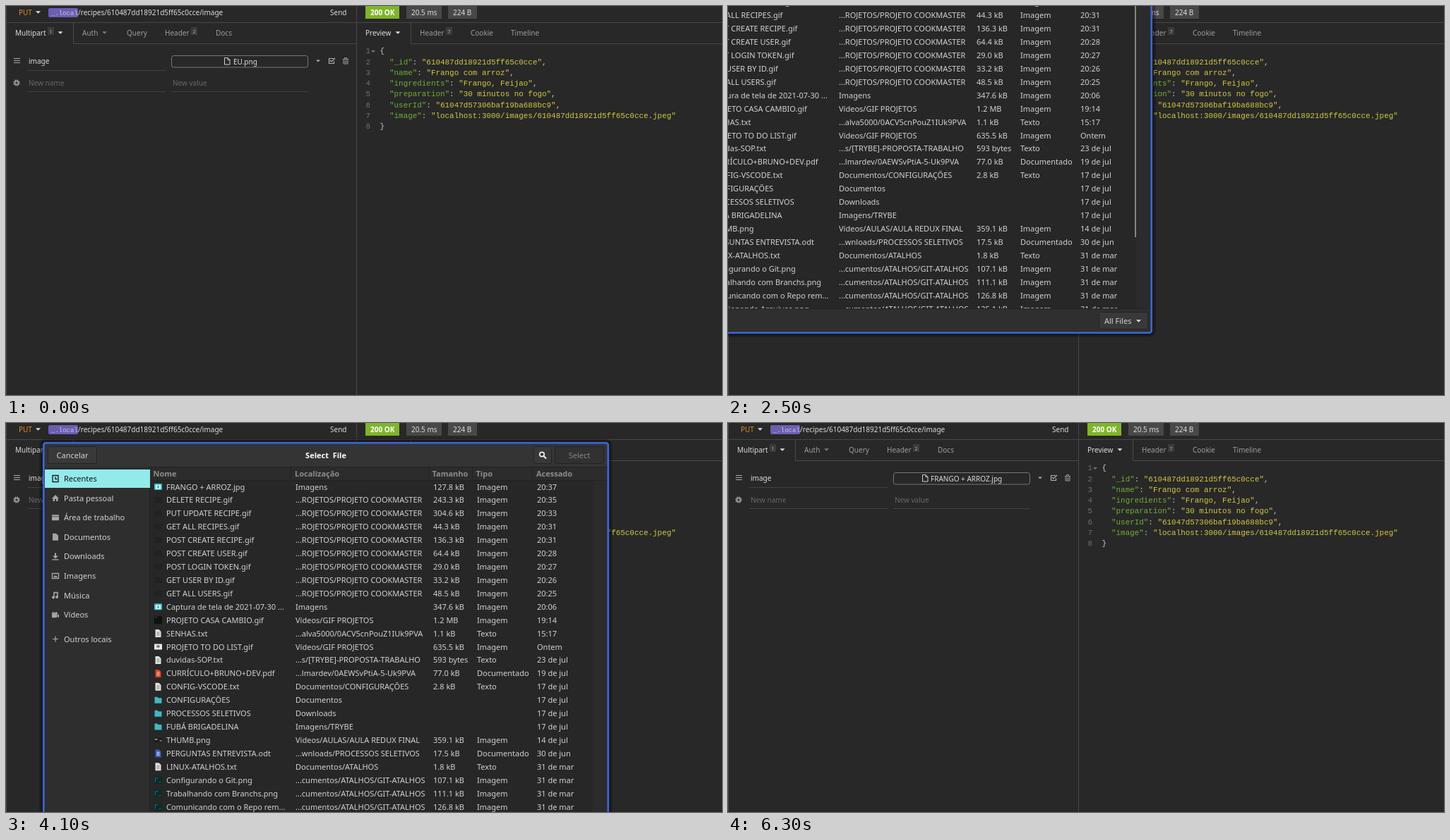
Animation, 1014 px wide and 552 px high, one loop 8000 ms. Source, as an HTML page:

```html
<!DOCTYPE html>
<html lang="pt">
<head>
<meta charset="utf-8">
<title>File picker</title>
<style>
html, body { margin: 0; width: 100%; height: 100%; overflow: hidden; background: #282828; }
svg { display: block; width: 1014px; height: 552px; }
text { font: 11px "Noto Sans", sans-serif; fill: #d2d2d2; white-space: pre; }
.app text { font-size: 10px; fill: #dcdcdc; }
.app .dim { fill: #9c9c9c; }
.app .faint { fill: #676767; }
.app .sup { font-size: 7px; fill: #b0b0b0; }
.app .put { fill: #dd8a25; }
.app .ok { fill: #fff; font-weight: 700; }
.app .mono { font: 10.91px "Liberation Mono", monospace; fill: #c8c8c8; }
.app .num { fill: #707070; text-anchor: end; }
.app .tag { font: 9px "Liberation Mono", monospace; fill: #cbc5ec; }
.key { fill: #72ad31; }
.str { fill: #d2c93f; }
.head { font-weight: 700; fill: #8d8d8d; }
.title { font-weight: 700; fill: #fff; text-anchor: middle; }
.mid { text-anchor: middle; }

.dlg, .dlg *, .app * { animation-duration: 8s; animation-timing-function: step-end; animation-iteration-count: infinite; }
.dlg { animation-name: move; }
.late { animation-name: late; }
.bar { animation-name: bar; }
.recent { animation-name: recent; }
.folder { animation-name: folder; }
.files { animation-name: files; }
.pick { animation-name: pick; }
.first text { animation-name: first; }
.chosen text { animation-name: chosen; }
.fadeout { animation-name: fadeout; }
.fadein { animation-name: fadein; }
.leave { animation-name: leave; }
.enter { animation-name: enter; }
.select { animation-name: select; }
.press { animation-name: press; }
.before { animation-name: before; }
.after { animation-name: after; }
@keyframes move {
  0% { opacity: 0; transform: translate(-247px, -107px); }
  6.25% { opacity: 1; transform: translate(-247px, -107px); }
  31.25% { opacity: 1; transform: translate(-200px, -107px); }
  33.75% { opacity: 1; transform: translate(-97px, -37px); }
  36.25% { opacity: 1; transform: translate(20px, 25px); }
  38.75% { opacity: 1; transform: translate(52px, 31px); }
  41.25% { opacity: 1; transform: translate(53px, 29px); }
  43.75% { opacity: 1; transform: translate(53px, 27px); }
  78.75%, 100% { opacity: 0; transform: translate(53px, 27px); }
}
@keyframes late { 0% { opacity: 0; } 13.75%, 100% { opacity: 1; } }
@keyframes bar {
  0% { opacity: 0; height: 391px; }
  16.25% { opacity: 1; height: 391px; }
  18.75% { opacity: 1; height: 378px; }
  51.25%, 100% { opacity: 0; height: 378px; }
}
@keyframes recent { 0% { opacity: 1; } 53.75%, 100% { opacity: 0; } }
@keyframes folder { 0% { opacity: 0; } 53.75%, 100% { opacity: 1; } }
@keyframes files { 0% { opacity: 0; } 56.25%, 100% { opacity: 1; } }
@keyframes pick { 0% { transform: none; } 71.25%, 100% { transform: translateY(113.5px); } }
@keyframes first { 0% { fill: #101010; } 71.25%, 100% { fill: #d2d2d2; } }
@keyframes chosen { 0% { fill: #d2d2d2; } 71.25%, 100% { fill: #101010; } }
@keyframes fadeout { 0% { opacity: 1; } 53.75% { opacity: .5; } 56.25%, 100% { opacity: 0; } }
@keyframes fadein { 0% { opacity: 0; } 53.75% { opacity: .5; } 56.25%, 100% { opacity: 1; } }
@keyframes leave { 0% { fill: #101010; color: #202020; } 56.25%, 100% { fill: #d2d2d2; color: #a5a5a5; } }
@keyframes enter { 0% { fill: #d2d2d2; color: #a5a5a5; } 53.75%, 100% { fill: #101010; color: #202020; } }
@keyframes select { 0% { fill: #858585; } 53.75% { fill: #acacac; } 56.25%, 100% { fill: #dcdcdc; } }
@keyframes press { 0% { fill: #313131; } 53.75% { fill: #393939; } 73.75%, 100% { fill: #222; } }
@keyframes before { 0% { opacity: 1; } 78.75%, 100% { opacity: 0; } }
@keyframes after { 0% { opacity: 0; } 78.75%, 100% { opacity: 1; } }
</style>
</head>
<body>
<svg id="stage" viewBox="0 0 1014 552">
  <defs><clipPath id="list"><rect x="151" y="36" width="648" height="500"/></clipPath></defs>
</svg>
<script>
const text = (x, y, s, cls = '') => `<text x="${x}" y="${y + 4}" class="${cls}">${s}</text>`;
const rect = (x, y, w, h, fill, more = '') =>
  `<rect x="${x}" y="${y}" width="${w}" height="${h}" fill="${fill}" ${more}/>`;
const path = (d, fill, more = '') => `<path d="${d}" fill="${fill}" ${more}/>`;
const line = (d, color, w = 1) => path(d, 'none', `stroke="${color}" stroke-width="${w}"`);
const at = (x, y, body, cls = '') => `<g transform="translate(${x} ${y})" class="${cls}">${body}</g>`;
const group = (cls, body) => `<g class="${cls}">${body}</g>`;
const caret = (x, y, color = '#ddd', r = 3.5) => path(`M${x - r} ${y - r / 2}h${2 * r}l${-r} ${r}z`, color);

// Request and response panes
function panes() {
  const edge = '#484848';
  const doc = x => line(`M${x} 73.5h4.5l3 3v6.500h-7.500zM${x + 4.5} 73.500v3h3`, '#d0d0d0');
  const json = [
    ['_id', '610487dd18921d5ff65c0cce'], ['name', 'Frango com arroz'],
    ['ingredients', 'Frango, Feijao'], ['preparation', '30 minutos no fogo'],
    ['userId', '61047d57306baf19ba688bc9'],
    ['image', 'localhost:3000/images/610487dd18921d5ff65c0cce.jpeg']
  ];
  const row = i => 63.2 + 15.3 * i;
  let s = rect(0, 0, 1014, 552, '#282828');
  s += line('M.5 0V552M496.5 0V552M0 23.500H1014M95.500 23V53.500H496M573.500 23V53.500H1014', edge);

  s += text(18, 9, 'PUT', 'put') + caret(45.500, 9);
  s += rect(60, 3, 42, 13, '#6a5fb0', 'rx="2"') + text(64, 9, '_.local', 'tag');
  s += text(102, 8.500, '/recipes/610487dd18921d5ff65c0cce/image') + text(459, 9, 'Send');
  s += rect(509, -2, 48, 20, '#7fb52b') + text(516, 9, '200 OK', 'ok');
  s += rect(567, -2, 50, 20, '#484848') + text(574, 9, '20.5 ms');
  s += rect(626, -2, 41, 20, '#484848') + text(633, 9, '224 B');

  s += text(13, 38, 'Multipart') + rect(59, 30, 9, 11, '#3c3c3c') + text(61.500, 34.500, '1', 'sup') + caret(77, 38);
  s += text(108, 38, 'Auth', 'dim') + caret(139.500, 38, '#777');
  s += text(171, 38, 'Query', 'dim') + text(225, 38, 'Header', 'dim') + text(297, 38, 'Docs', 'dim');
  s += rect(262, 30, 9, 11, '#3c3c3c') + text(264.500, 34.500, '2', 'sup');
  s += text(509, 38, 'Preview') + caret(555, 38);
  s += text(586, 38, 'Header', 'dim') + rect(623, 30, 9, 11, '#3c3c3c') + text(625.500, 34.500, '7', 'sup');
  s += text(658, 38, 'Cookie', 'dim') + text(715, 38, 'Timeline', 'dim');

  s += line('M11 74.500h9M11 77.500h9M11 80.500h9', '#aaa') + text(32, 78, 'image');
  s += line('M30 91.500H226M30 121.500H226M234 121.500H428', '#414141');
  s += rect(234.5, 70.5, 193, 16.5, 'none', 'rx="3" stroke="#777"');
  s += group('before', doc(309.5) + text(322, 78.500, 'EU.png'));
  s += group('after', doc(275.5) + text(287, 78.500, 'FRANGO + ARROZ.jpg'));
  s += caret(442, 78, '#aaa', 3);
  s += line('M464 74.500h-6.500v7h7v-3M459 77l2 2 5-5', '#b0b0b0', 1.2);
  s += line('M477 75.500h8M479.500 75v-1.500h3v1.500M478 76v6h6v-6M480 77v4M482 77v4', '#999');
  s += `<circle cx="15" cy="109" r="2.600" fill="none" stroke="#999" stroke-width="2"/>`;
  s += `<circle cx="15" cy="109" r="4" fill="none" stroke="#999" stroke-width="1.500" stroke-dasharray="1.570"/>`;
  s += text(32, 109, 'New name', 'faint') + text(236, 109, 'New value', 'faint');

  for (let i = 0; i < 8; i++) s += text(516, row(i), i + 1, 'mono num');
  s += caret(520, 64.500, '#777', 3) + text(529.5, row(0), '{', 'mono') + text(529.5, row(7), '}', 'mono');
  json.forEach(([k, v], i) => {
    s += text(543, row(i + 1), `<tspan class="key">"${k}"</tspan>: <tspan class="str">"${v}"</tspan>` +
      (i < 5 ? ',' : ''), 'mono');
  });
  return group('app', s);
}

// File type icons, centred on the origin
const page = (fill, mark) => path('M-4-5.500h5l3 3v8h-8z', fill) + line('M-2-1.500h4M-2 .500h4M-2 2.500h4', mark);
const icons = {
  cam: rect(-5.5, -4.5, 11, 9, '#43bfcb', 'rx="1"') + rect(-3.5, -2.5, 7, 5.5, '#e4f6f6') +
    '<circle r="1.700" cy=".3" fill="#43a5b2"/>',
  dark: rect(-5.5, -4, 11, 8, '#222'),
  black: rect(-5.5, -5.5, 11, 11, '#111') + rect(-4.5, -4.5, 3, 1, '#555'),
  white: rect(-5.5, -4, 11, 8, '#e8e8e8') + rect(-2, -2, 4, 3, '#666'),
  txt: page('#e2e2e2', '#888'),
  pdf: page('#d8431f', '#f3d8d0'),
  odt: page('#3d5fc4', '#dde4fa'),
  dir: path('M-5-4.500h4l1 1.500h5v7.500h-10z', '#3fb8c6'),
  thumb: rect(-5.5, -3, 11, 6, '#1c1c1c') + rect(-5, -2, 4, 2, '#8a8a8a') + rect(2, 0, 3, 2, '#777'),
  git: rect(-5.5, -5.5, 11, 11, '#0d2b2c') + line('M-4 3v-6h4M1 3h3', '#1d6b68'),
  cover: rect(-6, -1.5, 12, 3, '#22b887'),
  face: rect(-5.5, -6, 11, 12, '#c9c2b8') + '<circle r="2.500" cy="-2" fill="#4a3a33"/>' + path('M-5 6q0-5 5-5t5 5z', '#4a3a33'),
  sheet: rect(-6, -3.5, 12, 7, '#eee') + rect(-5, -2.5, 5, 1, '#999')
};

const cook = '...ROJETOS/PROJETO COOKMASTER', git = '...cumentos/ATALHOS/GIT-ATALHOS';
const recents = `cam|FRANGO + ARROZ.jpg|Imagens|127.8 kB|Imagem|20:37
dark|DELETE RECIPE.gif|${cook}|243.3 kB|Imagem|20:35
dark|PUT UPDATE RECIPE.gif|${cook}|304.6 kB|Imagem|20:33
dark|GET ALL RECIPES.gif|${cook}|44.3 kB|Imagem|20:31
dark|POST CREATE RECIPE.gif|${cook}|136.3 kB|Imagem|20:31
dark|POST CREATE USER.gif|${cook}|64.4 kB|Imagem|20:28
dark|POST LOGIN TOKEN.gif|${cook}|29.0 kB|Imagem|20:27
dark|GET USER BY ID.gif|${cook}|33.2 kB|Imagem|20:26
dark|GET ALL USERS.gif|${cook}|48.5 kB|Imagem|20:25
cam|Captura de tela de 2021-07-30 ...|Imagens|347.6 kB|Imagem|20:06
black|PROJETO CASA CAMBIO.gif|Vídeos/GIF PROJETOS|1.2 MB|Imagem|19:14
txt|SENHAS.txt|...alva5000/0ACV5cnPouZ1IUk9PVA|1.1 kB|Texto|15:17
white|PROJETO TO DO LIST.gif|Vídeos/GIF PROJETOS|635.5 kB|Imagem|Ontem
txt|duvidas-SOP.txt|...s/[TRYBE]-PROPOSTA-TRABALHO|593 bytes|Texto|23 de jul
pdf|CURRÍCULO+BRUNO+DEV.pdf|...lmardev/0AEWSvPtiA-5-Uk9PVA|77.0 kB|Documentado|19 de jul
txt|CONFIG-VSCODE.txt|Documentos/CONFIGURAÇÕES|2.8 kB|Texto|17 de jul
dir|CONFIGURAÇÕES|Documentos|||17 de jul
dir|PROCESSOS SELETIVOS|Downloads|||17 de jul
dir|FUBÁ BRIGADELINA|Imagens/TRYBE|||17 de jul
thumb|THUMB.png|Vídeos/AULAS/AULA REDUX FINAL|359.1 kB|Imagem|14 de jul
odt|PERGUNTAS ENTREVISTA.odt|...wnloads/PROCESSOS SELETIVOS|17.5 kB|Documentado|30 de jun
txt|LINUX-ATALHOS.txt|Documentos/ATALHOS|1.8 kB|Texto|31 de mar
git|Configurando o Git.png|${git}|107.1 kB|Imagem|31 de mar
git|Trabalhando com Branchs.png|${git}|111.1 kB|Imagem|31 de mar
git|Comunicando com o Repo rem...|${git}|126.8 kB|Imagem|31 de mar
git|Selecionando Arquivos.png|${git}|125.1 kB|Imagem|31 de mar`;
const pictures = `dir|BACKGROUND|||17 de jul
dir|Papéis de parede|||17 de jul
dir|TRYBE|||17 de jul
cover|capa trybe.jpeg|19.9 kB|Imagem|22 de jul
cam|Captura de tela de 2021-07-30 20-06-56.png|347.6 kB|Imagem|20:06
face|EU.png|444.6 kB|Imagem|14 de jul
cam|FRANGO + ARROZ.jpg|127.8 kB|Imagem|20:37
sheet|PASTAS.png|63.1 kB|Imagem|12 de mar
sheet|PROJETOS.png|97.7 kB|Imagem|12 de mar`;

const rows = (data, y0, cols, cls) => data.split('\n').map((r, i) => {
  const [icon, ...cells] = r.split('|');
  return at(0, y0 + 18.92 * i,
    at(162.5, 0, icons[icon]) + cells.map((c, j) => c && text(cols[j], 0, c)).join(''), cls(i));
}).join('');

function heads(y, names, xs, seps) {
  return rect(151, y - 9, 648, 18, '#2c2c2c') + line(`M151 ${y + 9.5}H799`, '#222') +
    seps.map(x => line(`M${x}.5 ${y - 9}v18`, '#222')).join('') +
    names.map((n, i) => text(xs[i], y, n, 'head')).join('');
}

function sidebar() {
  const c = 'currentColor';
  const places = [
    ['Recentes', line('M-4-4.500h8v9h-8zM0-2.500v3h2.500', c, 1.4)],
    ['Pasta pessoal', path('M-5 .500l5-5 5 5h-1.500v4h-2.500v-3h-2v3h-2.500v-4z', c)],
    ['Área de trabalho', rect(-5, -4, 10, 8, c) + line('M-5-1.500h10', '#555')],
    ['Documentos', path('M-4-5h5l3 3v7h-8z', c)],
    ['Downloads', path('M-1-5h2v4h3l-4 4-4-4h3z', c) + line('M-4.500 4.500h9', c, 1.4)],
    ['Imagens', line('M-4.500-3.500h9v7h-9z', c, 1.4) + path('M-3 2l2-3 1.500 1.500 1-1 1.500 2.500z', c)],
    ['Música', line('M-2 3v-7h5v6', c, 1.6) + '<circle cx="-3" cy="3" r="2" fill="currentColor"/><circle cx="2" cy="2.500" r="2" fill="currentColor"/>'],
    ['Vídeos', rect(-5, -1, 7, 5, c) + path('M2 1l3-2v5l-3-2z', c) + '<circle cx="-3" cy="-2" r="2" fill="currentColor"/><circle cx="1" cy="-2" r="2" fill="currentColor"/>']
  ];
  const state = ['leave', '', '', '', '', 'enter'];
  const y = i => 52 + 27.6 * i;
  const glow = (i, cls) => rect(2, y(i) - 13, 149, 26, '#93eaea', `class="${cls}"`);
  return rect(2, 35, 149, 501, '#2e2e2e') + line('M150.500 35V536', '#222') +
    glow(0, 'fadeout') + glow(5, 'fadein') +
    places.map(([name, icon], i) =>
      `<g class="${state[i] || ''}" color="#a5a5a5">${at(17, y(i), icon)}</g>` + text(29, y(i), name, state[i])).join('') +
    line('M13 279.500h8M17 275.500v8', '#aaa', 1.2) + text(29, 279.500, 'Outros locais');
}

function dialog() {
  const button = (x, y, w, h, more = '') => rect(x + .5, y + .5, w - 1, h - 1, '#393939', `rx="2" stroke="#232323" ${more}`);
  const shade = w => rect(0, 1, 800, 570, 'none', `rx="4" stroke="#000" stroke-opacity=".2" stroke-width="${w}"`);
  let s = shade(12) + shade(8) + rect(0, 1, 800, 570, '#272727', 'rx="4"');
  s += rect(1, 2, 798, 33, '#343434') + line('M1 35.500H799', '#222');
  s += button(6, 6, 70, 25) + text(41, 18.500, 'Cancelar', 'mid') + text(400, 18.500, 'Select  File', 'title');
  s += button(694, 6, 26, 25) + `<circle cx="706" cy="17.500" r="3.200" fill="none" stroke="#eee" stroke-width="1.700"/>` +
    line('M708.500 20l3.500 3.500', '#eee', 2);
  s += button(724, 6, 70, 25, 'class="press"') + text(759, 18.500, 'Select', 'mid select');
  s += sidebar();

  const recent = rect(778, 54, 21, 482, '#2b2b2b') +
    rows(recents, 63.5, [174, 357, 552, 614, 699], i => i > 7 ? 'late' : '') +
    heads(45, ['Nome', 'Localização', 'Tamanho', 'Tipo', 'Acessado'], [155.5, 356, 550.5, 612.5, 698], [350, 545, 607, 692]) +
    rect(776, 57, 2, 378, '#858585', 'class="bar"');
  const crumbs = button(156, 40, 20, 25) + button(175, 40, 103, 25) + button(340, 40, 18, 25) +
    rect(277, 40, 63, 25, '#1b1b1b') + path('M167 49.500v6l-3-3z', '#ccc') + path('M347 49.500v6l3-3z', '#777') +
    at(187.500, 52.500, path('M-5 .500l5-5 5 5h-1.500v4h-2.500v-3h-2v3h-2.500v-4z', '#ddd')) +
    text(196, 52, 'brunovelmar') + text(286, 52, 'Imagens');
  const marks = i => i === 0 ? 'first' : i === 6 ? 'chosen' : '';
  const folder = rect(151, 36, 648, 33, '#2a2a2a') + crumbs +
    heads(78, ['Nome', 'Tamanho', 'Tipo', 'Modificado'], [155.5, 595, 667, 721], [591, 662, 717]) +
    caret(580, 78.500, '#8d8d8d') +
    group('files', rect(152, 88, 647, 18.5, '#93eaea', 'class="pick"') +
      rows(pictures, 97, [174.5, 597, 668.5, 723], marks));
  s += `<g clip-path="url(#list)">${group('recent', recent)}${group('folder', folder)}</g>`;

  s += rect(1, 536, 798, 34, '#2f2f2f') + line('M1 536.500H799', '#222');
  s += button(725, 541, 70, 25) + text(733, 553.500, 'All Files') + caret(781.500, 554);
  s += rect(.3, 1.3, 799.4, 569.4, 'none', 'rx="3" stroke="#3b66d9" stroke-width="2.600"');
  return group('dlg', s);
}

document.getElementById('stage').insertAdjacentHTML('beforeend', panes() + dialog());
</script>
</body>
</html>
```
